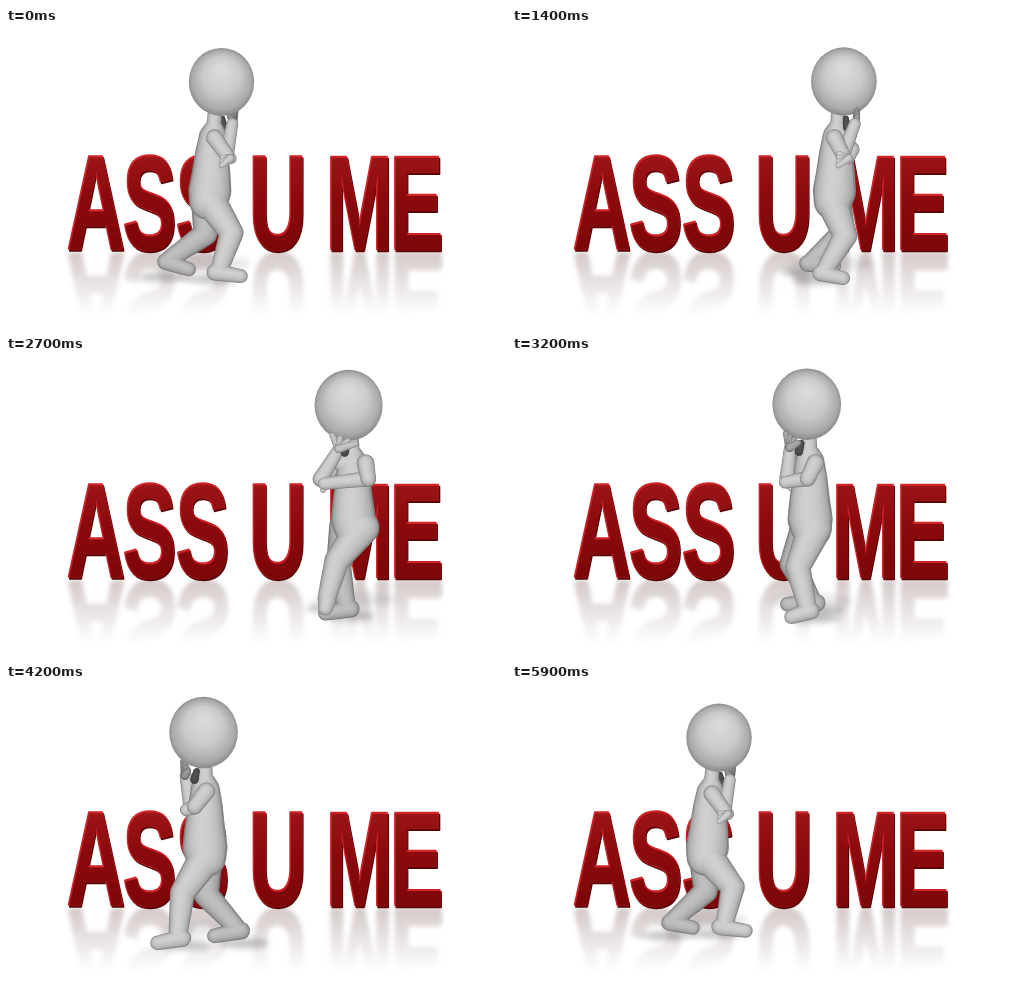
These frames come from a looping animation (500 by 300 pixels, 6 s). An HTML page with a canvas:

```html
<!DOCTYPE html>
<html lang="en">
<head>
<meta charset="utf-8">
<title>Assume</title>
<style>
html, body { margin: 0; width: 100%; height: 100%; overflow: hidden; background: #fff; }
canvas { display: block; }
</style>
</head>
<body>
<canvas id="stage" width="500" height="300"></canvas>
<script>
const LOOP = 6000, TICK = 100, STRIDE = 1200, BASE = 222, HIP_Y = 165;
const { PI, sin, cos, min, max, hypot, sqrt } = Math;
const ctx = document.getElementById('stage').getContext('2d');

const mix = (a, b, u) => a + (b - a) * u;
const wrap = (t, period) => (t % period + period) % period;
const progress = (t, from, to) => min(1, max(0, (t - from) / (to - from)));
const smooth = u => u * u * (3 - 2 * u);

// Constant speed with soft ends.
function glide(t, from, to) {
  const u = progress(t, from, to), e = .2, v = 1 / (1 - e);
  if (u < e) return v * u * u / (2 * e);
  if (u > 1 - e) return 1 - v * (1 - u) ** 2 / (2 * e);
  return v * (u - e / 2);
}

function hipAt(time) {
  const t = wrap(time, LOOP);
  return 157 + 210 * (glide(t, -850, 2250) - glide(t, 2250, 4900) + glide(t, 5150, 8250));
}

// 0 faces right, PI / 2 faces the viewer.
function headingAt(time) {
  const t = wrap(time, LOOP);
  return -.1 + PI * (smooth(progress(t, 900, 3700)) + smooth(progress(t, 4100, 5800)));
}

// +1 nearest to the viewer, -1 farthest.
const nearness = t => -cos(2 * PI * (t - 600) / LOOP);

// Each foot stands for half a stride and swings to its next place in the other half.
function footAt(t, side) {
  const phase = wrap(t + 50 + (side < 0 ? STRIDE / 2 : 0), STRIDE);
  const middle = t - phase + 250;
  const stand = time => hipAt(time) - 7 - side * 9 * sin(headingAt(time));
  const u = progress(phase, STRIDE / 2, STRIDE);
  const from = stand(middle), to = stand(middle + STRIDE);
  const lift = min(8, Math.abs(to - from) / 8) * sin(PI * u);
  return { x: mix(from, to, smooth(u)), y: 246 + 6 * nearness(t) - lift };
}

function makeLayer(draw) {
  const layer = document.createElement('canvas');
  layer.width = 500;
  layer.height = 300;
  draw(layer.getContext('2d'));
  return layer;
}

const letters = makeLayer(c => {
  c.font = 'bold 134px "Liberation Sans", Arial, sans-serif';
  c.lineJoin = 'round';
  c.lineWidth = 2.4;
  const face = c.createLinearGradient(0, -94, 0, 0);
  face.addColorStop(0, '#9c1518');
  face.addColorStop(.4, '#8c0a0d');
  face.addColorStop(1, '#7c0608');
  const glyphs = [['A', 61], ['S', 117], ['S', 170], ['U', 243], ['M', 320], ['E', 384]];
  for (const [glyph, x] of glyphs) {
    const print = (dx, dy, color, outlined) => {
      c.setTransform(.6, 0, 0, 1, x + dx, BASE + dy);
      c.fillStyle = c.strokeStyle = color;
      if (outlined) c.strokeText(glyph, 0, 0);
      c.fillText(glyph, 0, 0);
    };
    print(.8, .8, '#5a0406', true);
    print(-.6, -.6, '#cf2428', true);
    print(.3, .3, face, false);
  }
});

const scene = makeLayer(c => {
  c.fillStyle = '#fff';
  c.fillRect(0, 0, 500, 300);
  c.save();
  c.globalAlpha = .24;
  c.filter = 'blur(2px) saturate(.4)';
  c.translate(0, 2 * BASE + 4);
  c.scale(1, -1);
  c.drawImage(letters, 0, 0);
  c.restore();
  const fade = c.createLinearGradient(0, BASE, 0, 288);
  fade.addColorStop(0, '#fff0');
  fade.addColorStop(1, '#fff');
  c.fillStyle = fade;
  c.fillRect(0, BASE, 500, 80);
  c.drawImage(letters, 0, 0);
});

// A limb is a list of [x, y, radius]; limbs of one group are shaded as one solid.
function drawSolid(limbs, tone = 1) {
  const layers = 11;
  for (let k = 0; k < layers; k++) {
    const q = 1 - k / layers;
    const grey = Math.round(tone * (132 + 76 * sqrt(1 - q * q)));
    ctx.fillStyle = `rgb(${grey},${grey},${grey})`;
    ctx.beginPath();
    for (const limb of limbs) {
      for (let i = 1; i < limb.length; i++) {
        const a = limb[i - 1], b = limb[i];
        const n = Math.ceil(hypot(b[0] - a[0], b[1] - a[1]) / 1.2) || 1;
        for (let j = 0; j <= n; j++) {
          const [x, y, r] = a.map((v, m) => mix(v, b[m], j / n));
          const cx = x - (1 - q) * r * .15, cy = y - (1 - q) * r * .3;
          ctx.moveTo(cx + r * q, cy);
          ctx.arc(cx, cy, r * q, 0, 7);
        }
      }
    }
    ctx.fill();
  }
}

function drawHead(x, y, r) {
  const shade = ctx.createRadialGradient(x, y - r * .4, r * .1, x, y, r * 1.04);
  shade.addColorStop(0, '#dadada');
  shade.addColorStop(.5, '#cacaca');
  shade.addColorStop(.85, '#aaa');
  shade.addColorStop(1, '#888');
  ctx.fillStyle = shade;
  ctx.beginPath();
  ctx.ellipse(x, y, r, r * 1.04, 0, 0, 7);
  ctx.fill();
}

function drawShadow(x, y, rx, ry, alpha) {
  ctx.save();
  ctx.filter = 'blur(3px)';
  ctx.fillStyle = `rgba(70,70,70,${alpha})`;
  ctx.beginPath();
  ctx.ellipse(x, y, rx, ry, 0, 0, 7);
  ctx.fill();
  ctx.restore();
}

function drawWalker(t) {
  const hipX = hipAt(t), heading = headingAt(t), s = 1.025 + .03 * nearness(t);
  const c = cos(heading), d = sin(heading);
  const lean = 5 + 7 * c - 8 * d;

  // forward, rightward and upward offsets from the hip, then radius
  const place = (f, r, up, size) => [
    hipX + lean * .45 * up / 76 + s * (f * c - r * d),
    HIP_Y - s * up + s * .06 * (f * d + r * c),
    size * s
  ];
  const depth = (f, r) => f * d + r * c;

  const leg = side => {
    const foot = footAt(t, side);
    const behind = max(0, (hipX - foot.x) * c - 15);
    const ankle = [foot.x, foot.y - .35 * behind, 9 * s];
    const hip = place(0, side * 9, -6, 16.5);
    const dx = ankle[0] - hip[0], dy = ankle[1] - hip[1];
    const bend = .75 * sqrt(max(0, (42 * s) ** 2 - (dx * dx + dy * dy) / 4)) * c;
    const knee = [hip[0] + dx / 2 + bend, hip[1] + dy / 2 - bend * dx / 120, 12 * s];
    const toe = heading + side * .5;
    const tx = cos(toe) * s, ty = sin(toe) * s;
    drawShadow(foot.x - 8 * c, foot.y + 10 * s, 24 * s, 4.5 * s, .32);
    return [
      [hip, knee, ankle],
      [[ankle[0] - 5 * tx, ankle[1] + 3 * s, 8.5 * s],
       [ankle[0] + 23 * tx, foot.y + 5 * s + 5 * ty, 7 * s]]
    ];
  };

  drawShadow(hipX, 240 + 6 * nearness(t), 42, 8, .12);
  const legs = [leg(1), leg(-1)];
  const [far, near] = c < 0 ? legs : legs.reverse();

  const torso = [
    [place(0, 0, 82, 7), place(0, 0, 68, 7.5), place(0, 0, 56, 14), place(0, 0, 40, 16.5),
     place(1, 0, 18, 19.5), place(1, 0, 2, 21.5), place(0, 0, -8, 19)],
    [place(0, 11, 55, 9), place(0, -11, 55, 9)]
  ];

  const parts = [
    [0, () => drawSolid([...torso, ...near])],
    [1, () => drawHead(hipX + lean, HIP_Y - 111 * s, 32.7 * s)]
  ];
  const addLimb = (z, points, tone) => parts.push([z, () => drawSolid([points], tone)]);

  // The right hand holds the chin, the left arm crosses the chest.
  const rightElbow = place(12, 29, 40, 7.5), leftElbow = place(12, -25, 42, 7.5);
  const chinTone = .72 + .28 * max(0, d);
  addLimb(depth(9, 0), [place(8, 0, 74, 3), place(10, 2, 66, 4)], .4);
  addLimb(depth(6, 24), [place(0, 15, 56, 8.5), rightElbow]);
  addLimb(depth(15, 17), [rightElbow, place(18, 4, 69, 6)]);
  addLimb(depth(6, -20), [place(0, -15, 56, 8.5), leftElbow]);
  addLimb(depth(16, 0), [leftElbow, place(17, 22, 36, 6)]);
  for (let i = 0; i < 4; i++) {
    addLimb(depth(20, 2) + i * .1,
      [place(19, 3, 70, 4), place(20 - i, 9 - 8 * i, 83 - 2.5 * i, 2.8)], chinTone);
    addLimb(depth(16, 25) + i * .1,
      [place(17, 20, 36, 3.8), place(8, 29, 41 - 4 * i, 2.6)]);
  }

  drawSolid(far, .92);
  parts.sort((a, b) => a[0] - b[0]).forEach(([, draw]) => draw());
}

function render(now) {
  ctx.drawImage(scene, 0, 0);
  drawWalker(Math.floor(now % LOOP / TICK) * TICK);
  requestAnimationFrame(render);
}
render(performance.now());
</script>
</body>
</html>
```
